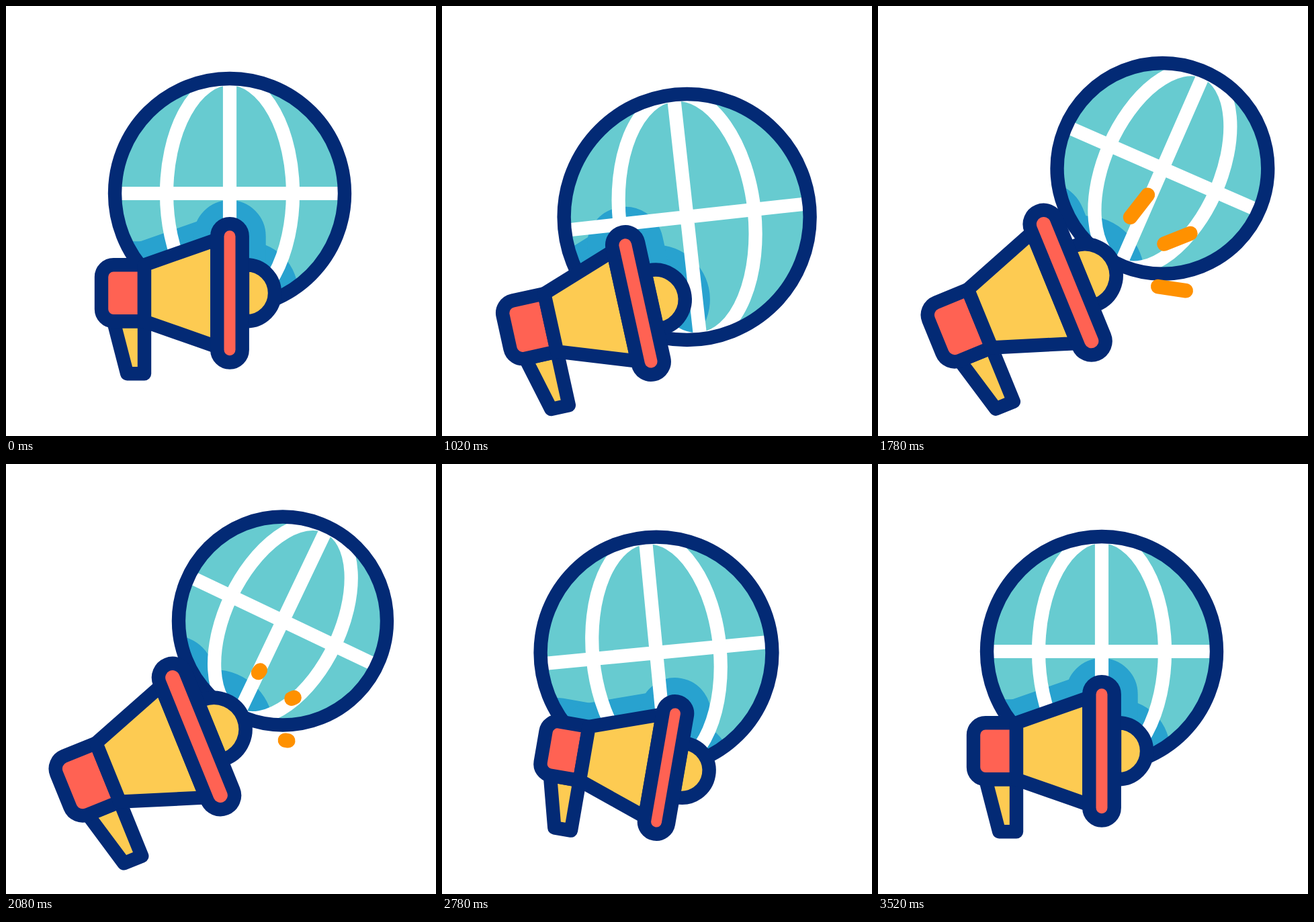
An HTML page that plays this animation: 640x640 px, repeating every 3.6 s.

```html
<!DOCTYPE html>
<html lang="en">
<head>
<meta charset="utf-8">
<title>Megaphone and globe</title>
<style>
  html, body { margin: 0; width: 100%; height: 100%; overflow: hidden; background: #fff; }
  svg { display: block; width: 100vw; height: 100vh; }
  .ink { stroke: #032a75; stroke-linejoin: round; }
  .red { fill: #ff6253; }
  .yellow { fill: #fdcb52; }
  #shadow, #shadow * { fill: #28a2cf; stroke: #28a2cf; stroke-linejoin: round; }
</style>
</head>
<body>
<svg viewBox="0 0 640 640" xmlns="http://www.w3.org/2000/svg">
  <defs>
    <clipPath id="disc"><circle id="discShape"/></clipPath>
    <g id="horn">
      <path class="yellow" d="M19-42H25A42 42 0 0 1 25 42H19Z"/>
      <path class="yellow" d="M-173 42L-152.8 120H-127V42Z"/>
      <path class="red" d="M-127-42H-173A18 18 0 0 0-191-24V24A18 18 0 0 0-173 42H-127Z"/>
      <path class="yellow" d="M-127-42L-18.7-80V80L-127 42Z"/>
      <rect class="red" x="-18.7" y="-103.2" width="37.4" height="206.4" rx="18.7"/>
    </g>
  </defs>
  <g clip-path="url(#disc)">
    <rect width="640" height="640" fill="#67cbd0"/>
    <g id="shadow"></g>
    <g id="grid" fill="none" stroke="#fff">
      <path d="M-171 0H171M0-171V171"/>
      <ellipse rx="94" ry="171"/>
    </g>
  </g>
  <circle id="ring" class="ink" fill="none" stroke-width="20.4"/>
  <g id="rays" stroke="#ff9100" stroke-width="21.5" stroke-linecap="round">
    <path/><path/><path/>
  </g>
  <g id="phone" class="ink"></g>
</svg>
<script>
const LOOP = 3600, LINE = 20.4, GLOBE_R = 171;
const el = id => document.getElementById(id);

// globe: x, y, radius, angle; phone: x, y, scale, angle
const rest = { globe: [333, 279, GLOBE_R, 0], phone: [333, 427.3, 1, 0] };
const poses = [
  { at: 0, ...rest },
  { at: 700, globe: [340, 296, 176, -3.6], phone: [324.5, 459.5, 0.937, 5.8] },
  { at: 1020, globe: [364.5, 314, 183, -6.3], phone: [292, 442.5, 1.05, -12.4] },
  { at: 1260, globe: [420, 288, 172, 9], phone: [281, 429, 1.09, -21] },
  { at: 1480, globe: [428.3, 258.7, 161.3, 19.2], phone: [281.4, 422.3, 1.1, -22.3] },
  { at: 2080, globe: [412, 233.5, 155, 25.5], phone: [283.5, 405.5, 1.12, -22.1] },
  { at: 2420, globe: [374, 232, 160.5, 14], phone: [312, 411, 1.06, -9] },
  { at: 2780, globe: [319, 281, 172.4, -5.5], phone: [333, 452, 0.969, 9.8] },
  { at: 3090, globe: [346, 281, 172.5, 2], phone: [335, 426, 1.003, -1.5] },
  { at: 3520, ...rest }
];

const slope = (a, b, part, n) => (b[part][n] - a[part][n]) / (b.at - a.at);

// Smooth tangent that never overshoots a pose
function tangent(i, part, n) {
  if (i === 0 || i === poses.length - 1) return 0;
  const p = slope(poses[i - 1], poses[i], part, n);
  const q = slope(poses[i], poses[i + 1], part, n);
  return p * q <= 0 ? 0 : 2 * p * q / (p + q);
}

function sample(part, t) {
  const next = poses.findIndex(pose => pose.at > t);
  if (next < 0) return rest[part];
  const i = next - 1, a = poses[i], b = poses[next];
  const h = b.at - a.at, u = (t - a.at) / h, v = 1 - u;
  return a[part].map((p, n) =>
    v * v * (1 + 2 * u) * p + u * u * (1 + 2 * v) * b[part][n] +
    h * u * v * (v * tangent(i, part, n) - u * tangent(next, part, n)));
}

function set(node, attrs) {
  for (const k in attrs) node.setAttribute(k, attrs[k]);
}

const place = (x, y, angle, s) => `translate(${x} ${y}) rotate(${angle}) scale(${s})`;

for (const id of ["shadow", "phone"])
  for (const part of el("horn").children) el(id).append(part.cloneNode());

// Three rays fan out of the dome, stretch and shrink back
function drawRays(t, x, y, s, angle) {
  const u = (t - 1476) / 626;
  const shown = u >= 0 && u <= 1;
  el("rays").style.display = shown ? "" : "none";
  if (!shown) return;
  const len = 42 * Math.sin(Math.PI * u);
  set(el("rays"), { transform: place(x, y, angle, 1) + ` translate(${25 * s} 0)` });
  [-1, 0, 1].forEach((side, i) => {
    const from = 130 - 17 * Math.abs(side) - 6 * u;
    set(el("rays").children[i], {
      d: `M${from} 0H${from + len + 0.01}`,
      transform: `rotate(${0.5 + 30.3 * side})`
    });
  });
}

function draw(t) {
  const [gx, gy, r, turn] = sample("globe", t);
  const k = r / GLOBE_R;
  set(el("discShape"), { cx: gx, cy: gy, r: r + 2 });
  set(el("ring"), { cx: gx, cy: gy, r });
  set(el("grid"), { transform: place(gx, gy, turn, k), "stroke-width": 20.2 / k });

  const [x, y, s, angle] = sample("phone", t);
  const transform = place(x, y, angle, s);
  const spread = 35 + Math.max(0, -angle) ** 2 / 70;
  set(el("phone"), { transform, "stroke-width": LINE / s });
  set(el("shadow"), { transform, "stroke-width": 2 * spread / s });
  drawRays(t, x, y, s, angle);
}

const start = performance.now();
function tick() {
  draw((performance.now() - start) % LOOP);
  requestAnimationFrame(tick);
}
tick();
</script>
</body>
</html>
```
